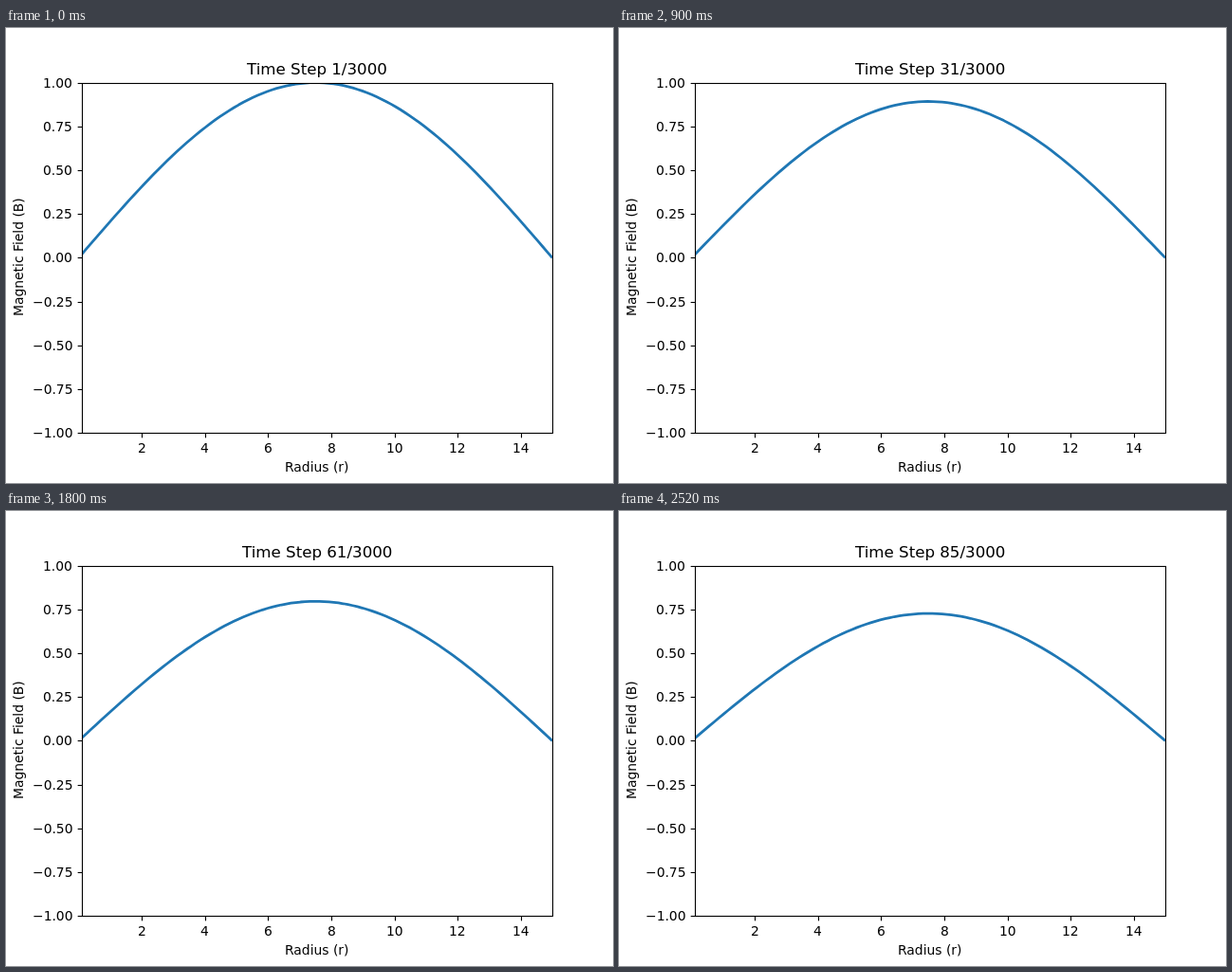
An HTML page with a canvas for the animation above (2550 ms loop, 640 by 480 pixels).

```html
<!DOCTYPE html>
<html lang="en">
<head>
<meta charset="utf-8">
<title>Magnetic field decay</title>
<style>
  html, body { margin: 0; width: 640px; height: 480px; overflow: hidden; background: #fff; }
  canvas { display: block; }
</style>
</head>
<body>
<canvas id="plot" width="640" height="480"></canvas>
<script>
const ctx = document.getElementById('plot').getContext('2d');
const STEP_MS = 30, STEPS = 85, DECAY = 0.0038;
const R_MIN = 0.1, R_MAX = 15;
const LEFT = 80, RIGHT = 576, TOP = 57.6, BOTTOM = 427.2;
const PT = 100 / 72;
const TICK = 3.5 * PT;

const toX = r => LEFT + (r - R_MIN) / (R_MAX - R_MIN) * (RIGHT - LEFT);
const toY = b => BOTTOM - (b + 1) / 2 * (BOTTOM - TOP);
const snap = v => Math.round(v) + 0.5;

// align: 0 = left, 0.5 = centre, 1 = right
function label(text, x, y, align = 0.5, points = 10) {
  ctx.font = `${points * PT}px "DejaVu Sans", sans-serif`;
  ctx.fillText(text, Math.round(x - ctx.measureText(text).width * align), y);
}

function line(x1, y1, x2, y2) {
  ctx.beginPath();
  ctx.moveTo(x1, y1);
  ctx.lineTo(x2, y2);
  ctx.stroke();
}

function drawCurve(amplitude) {
  ctx.save();
  ctx.beginPath();
  ctx.rect(LEFT, Math.round(TOP), RIGHT - LEFT, Math.round(BOTTOM) - Math.round(TOP));
  ctx.clip();
  ctx.beginPath();
  const points = 100;
  for (let i = 0; i < points; i++) {
    const r = R_MIN + (R_MAX - R_MIN) * i / (points - 1);
    ctx.lineTo(toX(r), toY(amplitude * Math.sin(Math.PI * r / R_MAX)));
  }
  ctx.strokeStyle = '#1f77b4';
  ctx.lineWidth = 2 * PT;
  ctx.lineJoin = 'round';
  ctx.stroke();
  ctx.restore();
}

function drawAxes() {
  ctx.strokeStyle = ctx.fillStyle = '#000';
  ctx.lineWidth = 0.8 * PT;
  const left = snap(LEFT), top = snap(TOP), bottom = snap(BOTTOM);
  ctx.strokeRect(left, top, snap(RIGHT) - left, bottom - top);

  for (let r = 2; r <= 14; r += 2) {
    const x = snap(toX(r));
    line(x, bottom, x, bottom + TICK);
    label(String(r), toX(r), 448);
  }
  for (let i = -4; i <= 4; i++) {
    const b = i / 4, y = snap(toY(b));
    line(left, y, left - TICK, y);
    label(b.toFixed(2).replace('-', '\u2212'), LEFT - 2 * TICK, Math.round(toY(b) + 5), 1);
  }

  label('Radius (r)', (LEFT + RIGHT) / 2, 468);
  ctx.save();
  ctx.translate(18, Math.round((TOP + BOTTOM) / 2));
  ctx.rotate(-Math.PI / 2);
  label('Magnetic Field (B)', 0, 0);
  ctx.restore();
}

function draw(step) {
  ctx.fillStyle = '#fff';
  ctx.fillRect(0, 0, 640, 480);
  drawCurve(Math.exp(-DECAY * step));
  drawAxes();
  label(`Time Step ${step + 1}/3000`, (LEFT + RIGHT) / 2, 49, 0.5, 12);
}

let start;
function tick(now) {
  start ??= now;
  draw(Math.floor(Math.max(0, now - start) / STEP_MS) % STEPS);
  requestAnimationFrame(tick);
}
draw(0);
requestAnimationFrame(tick);
</script>
</body>
</html>
```
